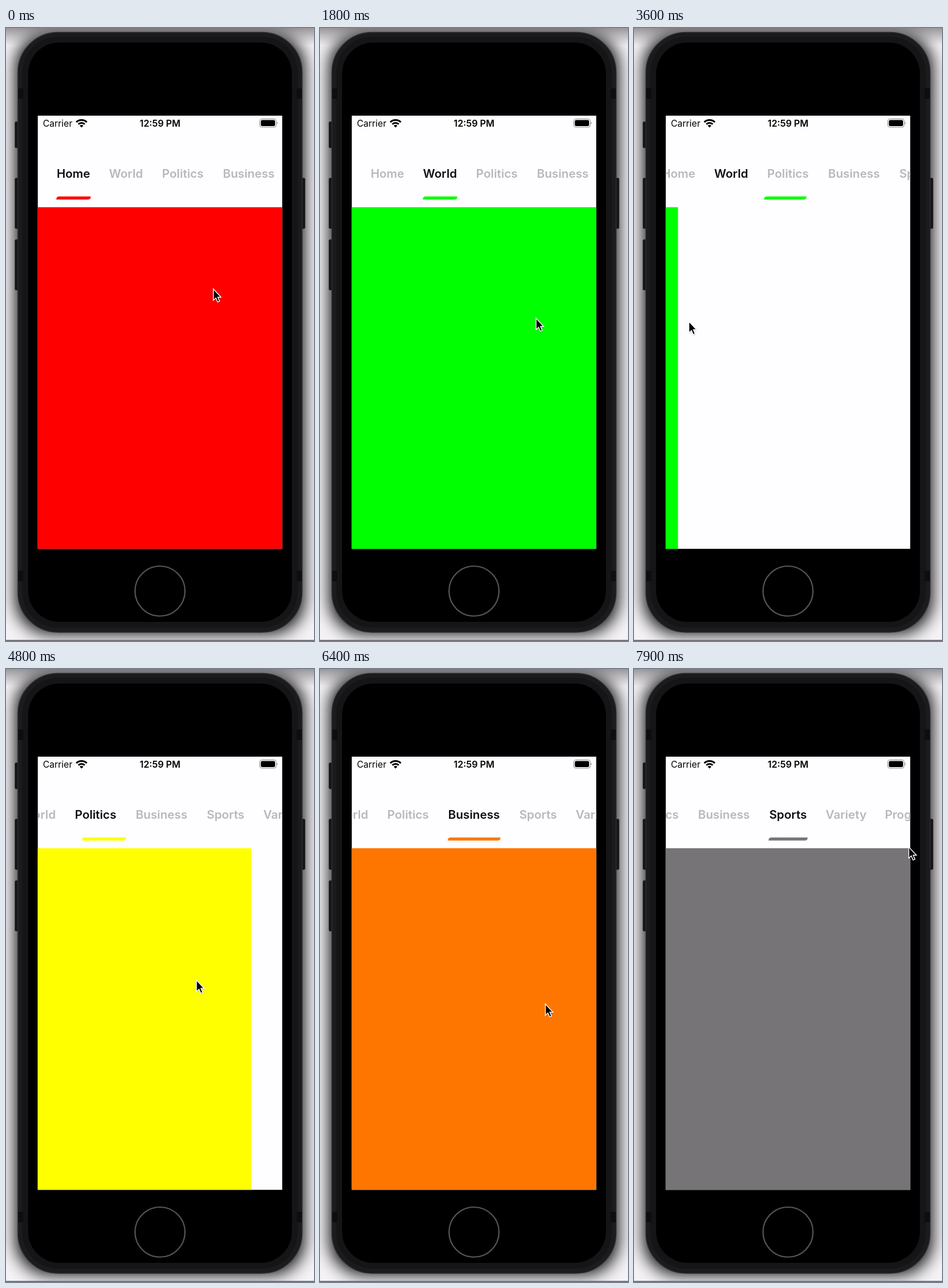
Recreate the animation shown at these times as an HTML page. Size 530 by 1056 pixels, loop 8000 ms.

```html
<!DOCTYPE html>
<html lang="en">
<head>
<meta charset="utf-8">
<title>Tab pager</title>
<style>
  html, body { margin: 0; width: 100%; height: 100%; overflow: hidden; background: #f4f2f5; }
  svg { display: block; width: 530px; height: 1056px; }
  text { font-family: Inter, Roboto, "Liberation Sans", sans-serif; }
  #tabs text { font-size: 20.3px; font-weight: 600; text-anchor: middle; }
</style>
</head>
<body>
<svg viewBox="0 0 530 1056">
  <defs>
    <filter id="blur" x="-20%" y="-20%" width="140%" height="140%"><feGaussianBlur stdDeviation="14"/></filter>
    <filter id="soft" x="-50%" y="-50%" width="200%" height="200%"><feGaussianBlur stdDeviation="1.2"/></filter>
    <linearGradient id="top" x2="0" y2="1">
      <stop offset="0" stop-color="#5c5a5d" stop-opacity=".6"/>
      <stop offset="1" stop-color="#5c5a5d" stop-opacity="0"/>
    </linearGradient>
    <clipPath id="screen"><rect x="54.7" y="151" width="420.6" height="746.3"/></clipPath>
  </defs>

  <rect width="530" height="1056" fill="#f4f2f5"/>
  <rect x="16" y="8" width="498" height="1036" rx="60" opacity=".92" filter="url(#blur)"/>
  <rect width="530" height="30" fill="url(#top)"/>
  <rect y="1054" width="530" height="2" fill="#777579"/>

  <g fill="#161517" stroke="#262528">
    <rect x="15.5" y="161.5" width="8" height="45" rx="2"/>
    <rect x="15.5" y="258.5" width="8" height="87" rx="2"/>
    <rect x="15.5" y="364.5" width="8" height="87" rx="2"/>
    <rect x="506.5" y="258.5" width="8" height="87" rx="2"/>
  </g>
  <rect x="20.5" y="7.5" width="489" height="1033.5" rx="69" fill="#1b1a1c" stroke="#2e2d30" stroke-width="1.5"/>
  <rect x="27" y="14" width="476" height="1020" rx="63" fill="#151416" stroke="#1f1e21"/>
  <g fill="#0e0d0f">
    <rect x="21" y="104" width="9" height="18"/><rect x="500" y="104" width="9" height="18"/>
    <rect x="21" y="935" width="9" height="18"/><rect x="500" y="935" width="9" height="18"/>
  </g>
  <rect x="38" y="25" width="454" height="998" rx="54"/>
  <circle cx="265" cy="970" r="43" fill="none" stroke="#565557" stroke-width="2.2"/>

  <g clip-path="url(#screen)">
    <rect x="54" y="151" width="422" height="747" fill="#fefdff"/>
    <text x="63.5" y="170" font-size="15.5">Carrier</text>
    <text x="265" y="170" font-size="15.8" font-weight="600" text-anchor="middle">12:59 PM</text>
    <g fill="none" stroke="#000" stroke-width="3">
      <path d="M121 162.2A12.7 12.7 0 0 1 139 162.2"/>
      <path d="M124.5 165.8A7.7 7.7 0 0 1 135.5 165.8"/>
      <path d="M130 171.5L126.8 168.3A4.5 4.5 0 0 1 133.2 168.3Z" fill="#000" stroke="none"/>
    </g>
    <rect x="436.5" y="156.5" width="28.5" height="14.5" rx="4" fill="none" stroke="#8d8b8f"/>
    <rect x="438.5" y="158.5" width="24.5" height="10.5" rx="2.5"/>
    <path d="M466 161.5Q468.5 163.7 466 166Z" fill="#8d8b8f"/>
    <g id="tabs"></g>
    <path id="bar"/>
    <rect id="page" x="54" y="308.7" height="589"/>
  </g>

  <g id="cursor">
    <path d="M1 1V21L5.5 17L8.5 24L12 22.5L9 15.5H15Z" opacity=".35" filter="url(#soft)"/>
    <path d="M.8 0V19.6L5.2 15.6L8.2 22.6L11.5 21.2L8.5 14.3H14Z" stroke="#fff" stroke-width="1.4"/>
  </g>
</svg>
<script>
const $ = id => document.getElementById(id);
const LOOP = 8000, STEP = 100;
const WIDTH = 420, CENTER = 265, GAP = 31.5;

const tabs = [
  { name: 'Home', w: 59, color: '#f00' },
  { name: 'World', w: 59, color: '#0f0' },
  { name: 'Politics', w: 73.5, color: '#ff0' },
  { name: 'Business', w: 90.5, color: '#fe7600' },
  { name: 'Sports', w: 67, color: '#767476' },
  { name: 'Variety', w: 70 },
  { name: 'Programs', w: 95 }
];

// Where each swipe is grabbed, and where the pointer wanders afterwards
const swipes = [
  { start: 60, grab: [356, 449.5], out: [371, 500] },
  { start: 2605, grab: [371, 500], out: [516, 548] },
  { start: 4500, grab: [396, 535], out: [505, 580] },
  { start: 6675, grab: [387, 577], out: [680, 150] }
];

const clamp = u => Math.min(1, Math.max(0, u));
const mix = (a, b, u) => a + (b - a) * u;
const smooth = u => (u = clamp(u), u * u * (3 - 2 * u));
const travel = ms => 1 - Math.exp(-((ms / 650) ** 2.59));

let edge = 86.5;
for (const tab of tabs) {
  tab.x = edge;
  tab.shift = Math.max(0, edge + tab.w / 2 - CENTER);
  edge += tab.w + GAP;
  tab.label = document.createElementNS('http://www.w3.org/2000/svg', 'text');
  tab.label.textContent = tab.name;
  tab.label.setAttribute('x', tab.x + tab.w / 2);
  tab.label.setAttribute('y', 258);
  $('tabs').append(tab.label);
}

// Drag left with the page, swing back out, then drift to the next grab point
function pointer(i, ms) {
  const { grab, out } = swipes[i];
  const next = swipes[i + 1] ? swipes[i + 1].grab : out;
  const drag = travel(Math.min(ms, 650));
  const held = [grab[0] - 16 * clamp(ms / 200) - WIDTH * drag, grab[1] + 8 * drag];
  const back = smooth((ms - 970) / 430), rest = smooth((ms - 1400) / 350);
  return held.map((v, k) => mix(mix(v, out[k], back), next[k], rest));
}

function render(t) {
  const i = Math.max(0, swipes.findLastIndex(s => s.start <= t));
  const ms = Math.max(0, t - swipes[i].start);
  const p = travel(ms), settled = p > .985;
  const part = settled ? 0 : p;
  const from = tabs[i], to = tabs[i + 1], current = settled ? to : from;

  const shift = mix(from.shift, to.shift, smooth(ms / 330));
  const reach = settled ? 1 : p;
  const left = mix(from.x, to.x, reach) - shift;
  const right = left + mix(from.w, to.w, reach) + .3;

  $('tabs').setAttribute('transform', `translate(${-shift} 0)`);
  for (const tab of tabs) tab.label.setAttribute('fill', tab === current ? '#0d0c0e' : '#b9b7bb');
  $('bar').setAttribute('d',
    `M${left} 295.6Q${left} 290.2 ${left + 5} 290.2H${right}Q${right} 295.6 ${right - 5} 295.6Z`);
  $('bar').setAttribute('fill', current.color);
  $('page').setAttribute('width', WIDTH * (1 - part) + (part ? 1 : 2));
  $('page').setAttribute('fill', current.color);
  $('cursor').setAttribute('transform', `translate(${pointer(i, ms)})`);
}

const start = performance.now();
function tick() {
  const t = (performance.now() - start) % LOOP;
  render(Math.floor(t / STEP) * STEP);
  requestAnimationFrame(tick);
}
tick();
</script>
</body>
</html>
```
